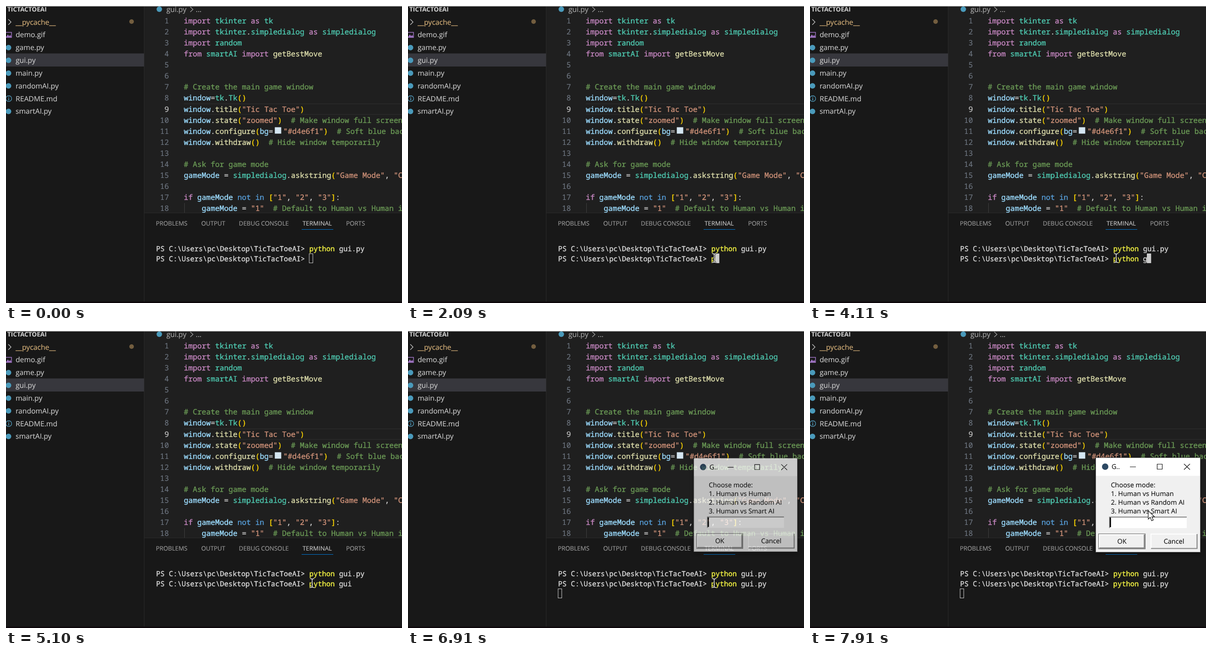
Animation of 864x648 px, one loop 8 s. Source, as an HTML page:

```html
<!DOCTYPE html>
<html lang="en">
<head>
<meta charset="utf-8">
<title>Editor and terminal</title>
<style>
html, body { margin: 0; width: 100%; height: 100%; overflow: hidden; background: #181818; }
svg { display: block; width: 864px; height: 648px; }
text { white-space: pre; text-rendering: geometricPrecision; color: #ccc; }
text, tspan { fill: currentColor; stroke: currentColor; stroke-width: .15px; }
.ui { font: 15.7px "Open Sans", sans-serif; }
.head { font: bold 13.6px "Open Sans", sans-serif; }
.tab { font: 13.3px "Open Sans", sans-serif; color: #9d9d9d; }
.code { font: 16.24px "Noto Sans Mono", monospace; }
.term { font: 15.47px "Noto Sans Mono", monospace; }
.code tspan, .term tspan { stroke-width: .4px; }
.dlg { font: 14.43px "Open Sans", sans-serif; color: #111; }
.mid { text-anchor: middle; }
.num { text-anchor: end; color: #6e7681; }
.on { color: #ccc; }
.k { color: #c586c0; } .t { color: #4ec9b0; } .f { color: #dcdcaa; }
.v { color: #9cdcfe; } .s { color: #ce9178; } .c { color: #6a9955; }
.b { color: #ffd700; } .n { color: #569cd6; } .d { color: #d4d4d4; }
.y { color: #f5f543; } .w { color: #d8d8d8; }
.line { fill: none; stroke: #ccc; stroke-width: 1.3; }
#dialog { filter: drop-shadow(0 3px 5px #0006); }
</style>
</head>
<body>
<svg id="stage" viewBox="0 0 864 648">
  <rect width="864" height="648" fill="#181818"/>
  <rect x="302" width="562" height="451" fill="#1f1f1f"/>
  <rect y="103.500" width="301" height="28.500" fill="#37373d"/>
  <path d="M301.500 0V646" stroke="#2b2b2b"/>
  <path d="M388 213.500H864M388 236.500H864" stroke="#292929" stroke-width="2"/>
  <path d="M389.500 430V451" stroke="#404040"/>

  <path class="line" d="M5 29L11 35L5 41"/>
  <circle cx="274" cy="34" r="5" fill="#735e3f"/>
  <path d="M-1 57.500H12V68.500H-1Z" fill="none" stroke="#a074c4" stroke-width="1.500"/>
  <path d="M0 68L4 62L7 66L9 63L12 68Z" fill="#a074c4"/>
  <circle cx="6" cy="202" r="6.300" fill="none" stroke="#519aba" stroke-width="1.400"/>
  <path d="M6 198V199.700M6 201V206" stroke="#519aba" stroke-width="1.700"/>
  <path class="line" d="M402 2L408 7.500L402 13" style="stroke:#a0a0a0"/>

  <g id="static"></g>

  <path d="M0 .5H864" stroke="#c8c8c8"/>
  <rect x="586.500" y="264.500" width="14" height="14" fill="#d4e6f1"/>
  <rect x="302" y="451" width="562" height="195" fill="#181818"/>
  <path d="M302 451.500H864" stroke="#2b2b2b"/>
  <path d="M645 487.500H714" stroke="#0078d4"/>
  <g id="panel"></g>
  <rect y="645" width="864" height="3" fill="#0d070b"/>

  <text id="typed" class="term" x="661.600" y="556.500"><tspan class="y"></tspan><tspan class="w"></tspan></text>
  <rect id="block"/>

  <g id="dialog">
    <rect x="623.500" y="276.500" width="228" height="206" fill="#f0f0f0" stroke="#666"/>
    <rect x="624" y="277" width="227" height="39" fill="#fff"/>
    <circle cx="644" cy="296" r="7" fill="#2d4963"/>
    <path d="M698 296.500H711M757.500 290.500H768.500V301.500H757.500ZM816 290L829 302.500M829 290L816 302.500" fill="none" stroke="#111" stroke-width="1.200"/>
    <rect x="653" y="405" width="169" height="25" fill="#fff"/>
    <path d="M653.500 430V406H822" fill="none" stroke="#858585" stroke-width="1.800"/>
    <rect id="caret" x="654" y="407" width="2.700" height="21"/>
    <rect x="629.500" y="442.500" width="102" height="33" fill="#f0f0f0" stroke="#646464"/>
    <path d="M631.500 474V444.500H730" fill="none" stroke="#fff" stroke-width="2"/>
    <path d="M631 473.500H729.500V444" fill="none" stroke="#808080" stroke-width="2.500"/>
    <path d="M744 475V443H845" fill="none" stroke="#fff" stroke-width="2"/>
    <path d="M744 474.500H844.500V443" fill="none" stroke="#858585" stroke-width="2.200"/>
  </g>

  <g id="beam">
    <path d="M-4.500 -9.500H-1.500L0 -8L1.500 -9.500H4.500M0 -8V8M-4.500 9.500H-1.500L0 8L1.500 9.500H4.500" fill="none" stroke="#000" stroke-width="3.200"/>
    <path d="M-4.500 -9.500H-1.500L0 -8L1.500 -9.500H4.500M0 -8V8M-4.500 9.500H-1.500L0 8L1.500 9.500H4.500" fill="none" stroke="#fff" stroke-width="1.500"/>
  </g>
  <path id="arrow" d="M.5 .5V19L4.800 15L8 22.500L11.500 21L8.300 13.800H14Z" fill="#fff" stroke="#000" stroke-width="1.100"/>
</svg>
<script>
const $ = id => document.getElementById(id);
const set = (el, attrs) => { for (const name in attrs) el.setAttribute(name, attrs[name]); };
const show = (el, on) => { el.style.display = on ? "" : "none"; };
const make = (tag, parent, attrs, text = "") => {
  const el = document.createElementNS("http://www.w3.org/2000/svg", tag);
  set(el, attrs);
  el.textContent = text;
  return parent.appendChild(el);
};
const label = (parent, cls, x, y, text) => make("text", parent, { class: cls, x, y }, text);

// Tokens are separated by "|"; the first letter of each is its colour class.
const tokens = (parent, cls, x, y, source) => {
  const row = label(parent, cls, x, y);
  for (const part of source.split("|"))
    if (part) make("tspan", row, { class: part[0] }, part.slice(1));
};

const fixed = $("static"), panel = $("panel"), dialog = $("dialog");

label(fixed, "head", 3, 11.5, "TICTACTOEAI");
["__pycache__", "demo.gif", "game.py", "gui.py", "main.py", "randomAI.py", "README.md", "smartAI.py"]
  .forEach((name, i) => {
    const y = 35 + i * 27.85;
    const row = label(fixed, "ui", 21, y + 5.5, name);
    if (!i) row.style.color = "#dbb57c";
    if (name.endsWith(".py")) make("circle", fixed, { cx: 5.5, cy: y, r: 6, fill: "#4a9abb" });
  });
make("circle", fixed, { cx: 334.5, cy: 7, r: 6, fill: "#4a9abb" });
label(fixed, "ui", 350, 13, "gui.py").style.color = "#a9a9a9";
label(fixed, "ui", 414, 13, "...").style.color = "#a9a9a9";

const lineY = i => 38 + i * 24.07;
[
  "kimport |ttkinter|k as |ttk",
  "kimport |ttkinter|d.|tsimpledialog|k as |tsimpledialog",
  "kimport |trandom",
  "kfrom |tsmartAI|k import |fgetBestMove",
  "",
  "",
  "c# Create the main game window",
  "vwindow|d=|ttk|d.|tTk|b()",
  'vwindow|d.|ftitle|b(|s"Tic Tac Toe"|b)',
  'vwindow|d.|fstate|b(|s"zoomed"|b)|c  # Make window full screen',
  "vwindow|d.|fconfigure|b(|vbg|d=",
  "vwindow|d.|fwithdraw|b()|c  # Hide window temporarily",
  "",
  "c# Ask for game mode",
  'vgameMode|d = |tsimpledialog|d.|faskstring|b(|s"Game Mode"|d, |s"Choose',
  "",
  'kif |vgameMode|n not in |b[|s"1"|d, |s"2"|d, |s"3"|b]|d:',
  'd    |vgameMode|d = |s"1"|c  # Default to Human vs Human if'
].forEach((source, i) => {
  label(fixed, i === 8 ? "code num on" : "code num", 355.5, lineY(i), i + 1);
  tokens(fixed, "code", 388, lineY(i), source);
});
tokens(fixed, "code", 605, lineY(10), 's"#d4e6f1"|b)|c  # Soft blue background');

[["PROBLEMS", 327], ["OUTPUT", 426], ["DEBUG CONSOLE", 508], ["TERMINAL", 647], ["PORTS", 742]]
  .forEach(([name, x]) => label(panel, name === "TERMINAL" ? "tab on" : "tab", x, 479, name));
const prompt = "wPS C:\\Users\\pc\\Desktop\\TicTacToeAI> ";
tokens(panel, "term", 327.5, 535, prompt + "|ypython|w gui.py");
tokens(panel, "term", 327.5, 556.5, prompt);

label(dialog, "dlg", 658, 301, "G..");
["Choose mode:", "1. Human vs Human", "2. Human vs Random AI", "3. Human vs Smart AI"]
  .forEach((text, i) => label(dialog, "dlg", 656.5, 341 + i * 19, text));
label(dialog, "dlg mid", 680.5, 463.5, "OK");
label(dialog, "dlg mid", 794, 463.5, "Cancel");

const command = "python gui.py";
const keyTimes = [2090, 2490, 2760, 2900, 3110, 3430, 3580, 4040, 4240, 4440, 5170, 5500, 5900];
const blanks = [2830, 4170, 5100, 5830]; // cursor drops out for one 70 ms step
const enterAt = 6380, openAt = 6840, clickAt = 1280, cell = 9.28;
const [yellow, plain] = $("typed").children;

const path = [
  [70, 749, 652], [300, 720, 608], [600, 682, 566], [870, 663, 551], [1000, 658, 545],
  [1150, 673, 553], [1330, 668, 550], [6930, 668, 550], [7250, 700, 478], [7560, 738.5, 392.5]
];
const pointer = t => {
  const next = path.findIndex(p => p[0] > t);
  if (next < 0) return path.at(-1).slice(1);
  const a = path[Math.max(0, next - 1)], b = path[next];
  const u = Math.max(0, (t - a[0]) / (b[0] - a[0]));
  return [a[1] + (b[1] - a[1]) * u, a[2] + (b[2] - a[2]) * u];
};

function draw(t) {
  const count = keyTimes.filter(k => k <= t).length;
  yellow.textContent = command.slice(0, Math.min(count, 6));
  plain.textContent = command.slice(6, Math.max(count, 6));

  const entered = t >= enterAt;
  const focused = t >= clickAt && t < 6640;
  const x = Math.floor(entered ? 327.5 : 661.7 + count * cell), y = entered ? 562 : 540;
  show($("block"), !blanks.some(b => t >= b && t < b + 70));
  set($("block"), focused
    ? { x, y, width: cell, height: 21, fill: "#ccc", stroke: "none" }
    : { x: x + .5, y: y + .5, width: 8, height: 20, fill: "none", stroke: "#ccc" });

  const step = Math.floor((t - openAt) / 70) * 70;
  const alpha = Math.min(1, (step + 60) / 170);
  const scale = 1 - .04 * (1 - alpha);
  show(dialog, t >= openAt);
  set(dialog, {
    opacity: Math.max(0, alpha),
    transform: `translate(${737.5 - (1 - alpha) * 4} 379.5) scale(${scale}) translate(-737.5 -379.5)`
  });
  show($("caret"), t < 7350 || t >= 7650);

  const [px, py] = t >= 7910 ? [737.5, 391.5] : pointer(Math.floor(t / 70) * 70);
  const overDialog = t >= openAt && py < 482;
  const move = { transform: `translate(${px} ${py})` };
  show($("beam"), t >= 70 && !overDialog);
  show($("arrow"), overDialog);
  set($("beam"), move);
  set($("arrow"), move);
}

const start = performance.now();
function tick() {
  draw((performance.now() - start) % 8000);
  requestAnimationFrame(tick);
}
tick();
</script>
</body>
</html>
```
